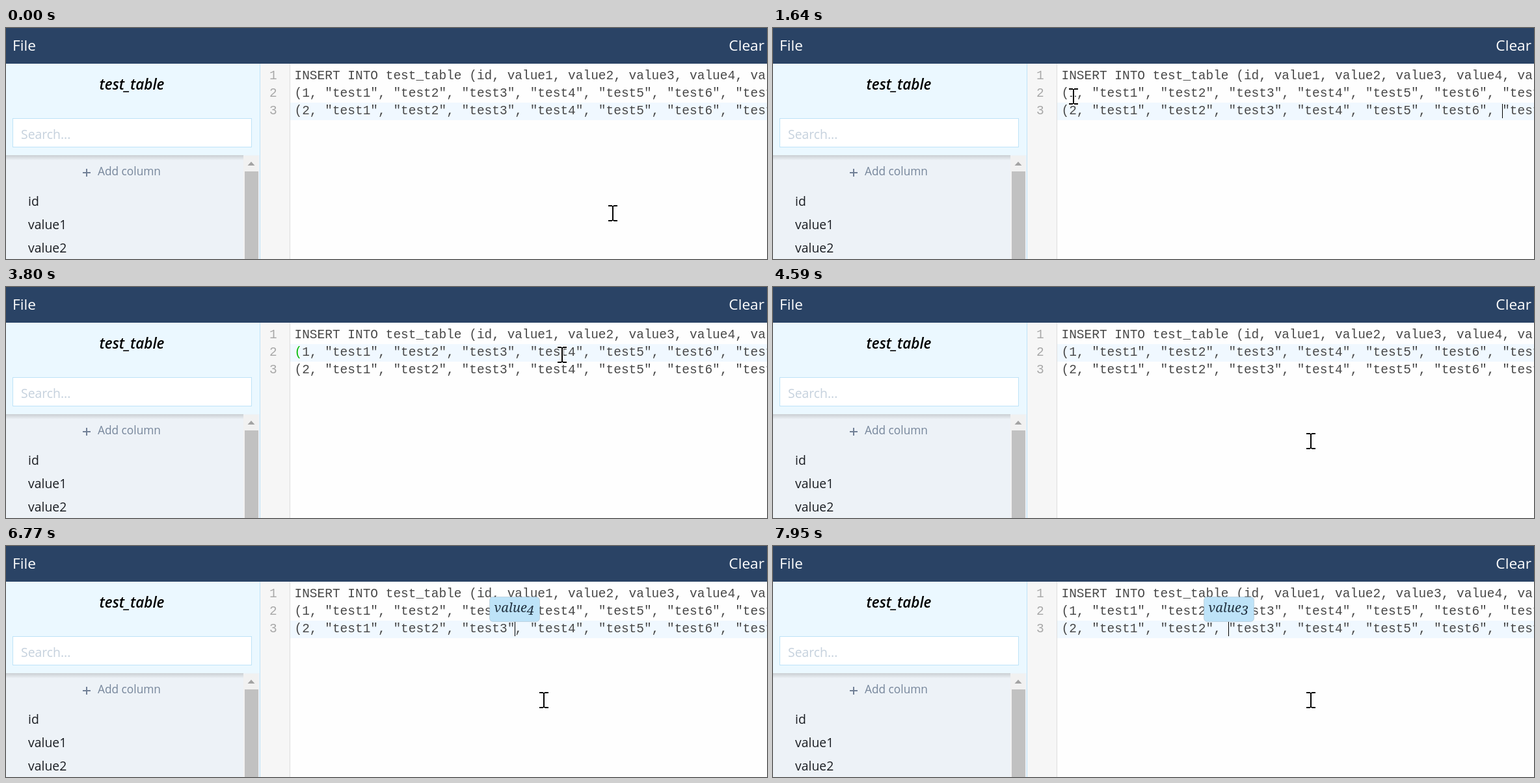
Write an HTML page with a canvas that moves like this. It is 1170 by 356 pixels and loops after 8 s.

```html
<!DOCTYPE html>
<html lang="en">
<head>
<meta charset="utf-8">
<title>SQL insert editor</title>
<style>
  html, body { margin: 0; width: 100%; height: 100%; overflow: hidden; background: #fff; }
  canvas { display: block; }
</style>
</head>
<body>
<canvas id="stage" width="1170" height="356"></canvas>
<script>
const ctx = document.getElementById('stage').getContext('2d');
const LOOP = 8000, TICK = 78, BLINK = 609, TIP_TIME = 480;
const KEY_START = 5990, KEY_STEP = 155;
const TEXT_X = 443, CELL = 11.69, ROW_H = 27;
const SANS = '"Open Sans", "Noto Sans", sans-serif';
const MONO = '19.48px "Liberation Mono", monospace';
const SERIF = 'italic 20px "Noto Serif", serif';

const rowTop = row => 34 + row * ROW_H;
const range = (n, fn) => Array.from({ length: n }, (_, i) => fn(i + 1));
const values = id => `(${id}, ${range(9, i => `"test${i}"`).join(', ')}),`;
const lines = [
  `INSERT INTO test_table (id, ${range(9, i => 'value' + i).join(', ')}) VALUES`,
  values(1),
  values(2)
];

const clicks = [
  { since: -920, col: 58, row: 3 },
  { since: 1720, col: 1, row: 2 },
  { since: 3950, col: 35, row: 2 },
  { since: 5050, col: 35, row: 3 }
];

const home = { x: 933, y: 285 };
const moves = [
  { at: 150, ms: 700, x: 521, y: 72 },
  { at: 850, ms: 240, x: 532, y: 114 },
  { at: 1170, ms: 400, x: 462, y: 105 },
  { at: 1720, ms: 350, x: 580, y: 184 },
  { at: 3170, ms: 630, x: 861, y: 102 },
  { at: 3950, ms: 320, x: 827, y: 237 }
];

function rect(x, y, w, h, color) {
  ctx.fillStyle = color;
  ctx.fillRect(x, y, w, h);
}

function text(str, x, y, font, color, align = 'left') {
  ctx.font = font;
  ctx.fillStyle = color;
  ctx.textAlign = align;
  ctx.fillText(str, x, y);
}

// The left arrow key repeats at a steady rate once pressed
function caretAt(t) {
  if (t < KEY_START) return clicks.filter(c => c.since <= t).pop();
  const n = Math.floor((t - KEY_START) / KEY_STEP);
  return { since: KEY_START + n * KEY_STEP, col: 34 - n, row: 3 };
}

function mouseAt(time) {
  const t = Math.floor(time / TICK) * TICK;
  return moves.reduce((pos, { at, ms, x, y }) => {
    const p = Math.min(1, Math.max(0, (t - at) / ms));
    const e = p * p * (3 - 2 * p);
    return { x: pos.x + (x - pos.x) * e, y: pos.y + (y - pos.y) * e };
  }, home);
}

function drawHeader() {
  const font = `22.7px ${SANS}`;
  rect(0, 0, 1170, 55, '#2a4365');
  text('File', 10, 35, font, '#fff');
  text('Clear', 1166, 35, font, '#fff', 'right');
}

function drawSidebar() {
  rect(0, 55, 390, 141, '#ebf8ff');
  rect(0, 196, 390, 160, '#edf2f7');
  const shade = ctx.createLinearGradient(0, 196, 0, 204);
  shade.addColorStop(0, 'rgba(0,0,0,.15)');
  shade.addColorStop(1, 'rgba(0,0,0,0)');
  rect(0, 196, 365, 8, shade);
  rect(390, 55, 1, 301, '#bee3f8');

  text('test_table', 193.5, 95, `italic 600 22.5px ${SANS}`, '#000', 'center');
  rect(10, 139, 368, 45, '#bee3f8');
  rect(11, 140, 366, 43, '#fff');
  text('Search...', 23, 171, `19.4px ${SANS}`, '#c5d1dd');

  rect(118, 222, 12, 2, '#718096');
  rect(123, 217, 2, 12, '#718096');
  text('Add column', 141, 227, `17.3px ${SANS}`, '#76869b');
  ['id', 'value1', 'value2'].forEach((name, i) =>
    text(name, 34, 274 + i * 36, `19.4px ${SANS}`, '#1a1d22'));

  rect(365, 197, 23, 159, '#f1f1f1');
  rect(367, 221, 21, 135, '#c1c1c1');
  ctx.fillStyle = '#a3a3a3';
  ctx.beginPath();
  ctx.moveTo(371.5, 212);
  ctx.lineTo(377, 206);
  ctx.lineTo(382.5, 212);
  ctx.fill();
}

function drawEditor({ col, row }) {
  rect(391, 55, 45, 301, '#f6f6f6');
  rect(436, 55, 1, 301, '#ddd');
  rect(437, 55, 733, 301, '#fefefe');
  rect(437, rowTop(row) - 0, 733, ROW_H, '#f0f8ff');
  lines.forEach((line, i) => {
    const y = rowTop(i + 1) + 18;
    const matched = col === 1 && row === i + 1;
    text(i + 1, 405, y, MONO, '#a8a8a8');
    text(line[0], TEXT_X + 0.5, y, MONO, matched ? '#0b0' : '#484848');
    text(line.slice(1), TEXT_X + 0.5 + CELL, y, MONO, '#484848');
  });
}

function drawTip({ col, row }, caretX) {
  const name = col < 3 ? 'id' : 'value' + (1 + Math.floor((col - 2) / 9));
  const w = name === 'id' ? 34 : 78;
  const left = Math.round(caretX - w / 2 + 0.4);
  const top = rowTop(row) - 37;
  ctx.beginPath();
  ctx.roundRect(left + 0.5, top + 0.5, w - 1, 38, 5);
  ctx.fillStyle = '#bee3f8';
  ctx.fill();
  ctx.strokeStyle = 'rgba(90,110,130,.2)';
  ctx.stroke();

  // Old-style digit hangs below the baseline
  const [, word, digit] = name.match(/(\D+)(\d?)/);
  text(word, left + 7.5, top + 24, SERIF, '#20303f');
  text(digit, left + 7.5 + ctx.measureText(word).width, top + 28, SERIF, '#20303f');
}

function drawMouse({ x, y }) {
  for (const [edge, color] of [[1, '#fff'], [0, '#000']]) {
    const bar = (dx, dy, w, h) =>
      rect(Math.round(x) + dx - edge, Math.round(y) + dy - edge, w + 2 * edge, h + 2 * edge, color);
    bar(-1, -11, 2, 23);
    for (const dy of [-12, 11]) {
      bar(-7, dy, 6, 2);
      bar(1, dy, 6, 2);
    }
  }
}

function draw(t) {
  const caret = caretAt(t);
  const caretX = TEXT_X + caret.col * CELL;
  const age = t - caret.since;

  drawHeader();
  drawSidebar();
  drawEditor(caret);
  if (Math.floor(age / BLINK) % 2 === 0) {
    rect(Math.floor(caretX), rowTop(caret.row) + 2, 1, 22, '#000');
  }
  if (caret.since > 0 && age < TIP_TIME) drawTip(caret, caretX);
  drawMouse(mouseAt(t));
}

const start = performance.now();
function frame() {
  draw((performance.now() - start) % LOOP);
  requestAnimationFrame(frame);
}
frame();
</script>
</body>
</html>
```
